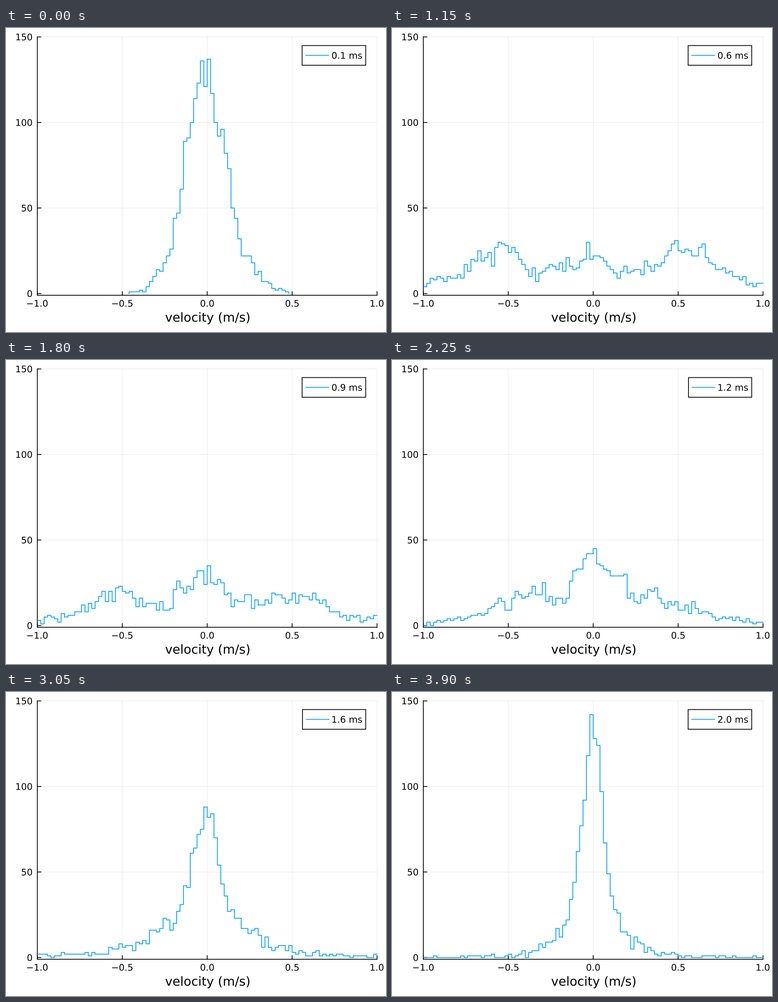
Recreate the animation shown at these times as a matplotlib script. Size 837 px wide and 669 px high, loop 3950 ms.

```python
import numpy as np
import matplotlib
import matplotlib.pyplot as plt
from matplotlib.animation import FuncAnimation
from matplotlib.patches import PathPatch, Rectangle
from matplotlib.textpath import TextPath
from matplotlib.transforms import Affine2D

matplotlib.rcParams["font.family"] = "DejaVu Sans"
matplotlib.rcParams["path.snap"] = False

W, H, DPI = 837, 669, 100
FRAMES, INTERVAL = 79, 50
LEFT, RIGHT, TOP, BOTTOM = 69, 817.3, 19.6, 588.2
X0, X_UNIT = 443.2, 374.1
Y0, Y_UNIT = 584.4, 3.765
BLUE = "#009AFA"
PX = 72 / DPI

# Velocity profile: counts per bin at a few knots (in bins of 0.02 m/s)
HALF = np.array([1, 3, 5, 8, 12, 18, 25, 32, 40, 50])
KNOTS = np.concatenate([-HALF[::-1], HALF])
KEY_FRAMES = [0, 11, 23, 36, 54, 68, 78]
PROFILES = [
    [0, 0, 0, 0, 2, 20, 55, 96, 110, 126, 122, 104, 83, 49, 18, 5, 0, 0, 0, 0],
    [3, 7, 15, 38, 25, 23, 26, 16, 28, 44, 39, 35, 22, 24, 17, 28, 29, 19, 6, 4],
    [6, 10, 22, 26, 12, 13, 17, 16, 20, 23, 22, 20, 16, 12, 15, 15, 26, 24, 11, 4],
    [3, 5, 16, 21, 12, 11, 21, 21, 28, 29, 31, 26, 21, 16, 17, 13, 17, 14, 5, 4],
    [1, 3, 5, 8, 12, 17, 27, 43, 54, 71, 72, 57, 37, 22, 16, 10, 8, 4, 2, 1],
    [1, 1, 1, 2, 5, 14, 30, 50, 74, 111, 115, 76, 42, 23, 6, 5, 1, 1, 0.6, 0.4],
    [0.1, 0.4, 0.5, 0.8, 3, 8, 17, 50, 89, 133, 131, 78, 40, 18, 8, 3.5, 0.7, 0.3, 0.4, 0.2],
]
EDGES = np.arange(-50, 51)
LEVELS = np.linspace(0, 1, 3001)[1:-1]


def quantiles(profile):
    counts = np.interp(EDGES[:-1] + 0.5, KNOTS, profile)
    cdf = np.concatenate([[0], np.cumsum(counts)])
    return np.interp(LEVELS, cdf / cdf[-1], EDGES), cdf[-1]


QUANTS = [quantiles(p) for p in PROFILES]


def histogram(i):
    """Counts per bin: spread the cloud between two profiles, add shot noise."""
    k = min(np.searchsorted(KEY_FRAMES, i, side="right") - 1, len(KEY_FRAMES) - 2)
    a, b = KEY_FRAMES[k], KEY_FRAMES[k + 1]
    f = (i - a) / (b - a)
    (qa, na), (qb, nb) = QUANTS[k], QUANTS[k + 1]
    pos = (1 - f) * qa + f * qb
    total = (1 - f) * na + f * nb
    mean = total * np.diff(np.interp(EDGES, pos, LEVELS, left=0, right=1))
    noise = np.random.default_rng(100 + i).normal(size=len(mean))
    return np.maximum(0, np.rint(mean + 0.7 * np.sqrt(mean) * noise))


# The small margin keeps the pixel size from rounding down
fig = plt.figure(figsize=((W + 0.01) / DPI, (H + 0.01) / DPI), dpi=DPI,
                 facecolor="white")
ax = fig.add_axes([0, 0, 1, 1])
ax.set_xlim(0, W)
ax.set_ylim(H, 0)
ax.axis("off")


def line(x, y, color="black", width=1.7, **kw):
    return ax.plot(x, y, color=color, lw=width * PX, **kw)[0]


def text_path(s, x, base, size, align="center"):
    path = TextPath((0, 0), s, size=size)
    box = path.get_extents()
    shift = {"left": 0, "center": (box.x0 + box.x1) / 2, "right": box.x1}[align]
    return Affine2D().translate(-shift, 0).scale(1, -1).translate(x, base).transform_path(path)


def text(*args, **kw):
    patch = PathPatch(text_path(*args, **kw), fc="black", lw=0, zorder=6)
    return ax.add_patch(patch)


for v in (-1.0, -0.5, 0.0, 0.5, 1.0):
    x = X0 + X_UNIT * v
    line([x, x], [TOP, BOTTOM], alpha=0.1, width=0.9, zorder=1)
    line([x, x], [BOTTOM, BOTTOM - 8], zorder=2)
    text(f"{v:.1f}".replace("-", "\u2212"), x, 613.2, 20)

for n in (0, 50, 100, 150):
    y = Y0 - Y_UNIT * n
    line([LEFT, RIGHT], [y, y], alpha=0.1, width=0.9, zorder=1)
    line([LEFT, LEFT + 8], [y, y], zorder=2)
    text(str(n), 57.3, y + 7.4, 20, align="right")

line([LEFT, LEFT, RIGHT], [TOP, BOTTOM, BOTTOM], zorder=2)
text("velocity (m/s)", X0 + 0.5, 646.3, 27.5)

curve = line([], [], BLUE, zorder=3, solid_joinstyle="miter")
curve.set_clip_path(Rectangle((LEFT, TOP - 0.5), RIGHT - LEFT + 0.5,
                              BOTTOM - TOP, transform=ax.transData))

box = ax.add_patch(Rectangle((652.3, 38.6), 140, 43.4, fc="white", ec="black",
                             lw=1.7 * PX, zorder=4))
sample = line([], [], BLUE, zorder=5)
label = text("0.1 ms", 716.8, 67.6, 20, align="left")


def draw(i):
    counts = histogram(i)
    used = np.flatnonzero(counts)
    lo, hi = (used[0], used[-1] + 1) if i < 8 else (0, len(counts))
    x = np.repeat(X0 + X_UNIT * EDGES[lo:hi + 1] / 50, 2)
    y = np.concatenate([[0], np.repeat(counts[lo:hi], 2), [0]])
    if i >= 8:
        x, y = x[1:-1], y[1:-1]
    curve.set_data(x, Y0 - Y_UNIT * y)

    s = f"{(i + 2) / 40:.1f} ms"
    left = 653.1 if s[0] == "1" else 652.3
    box.set_x(left)
    box.set_width(792.3 - left)
    sample.set_data([left + 8, left + 58.6], [60.3, 60.3])
    label.set_path(text_path(s, 716.8, 67.6, 20, align="left"))
    return curve, box, sample, label


anim = FuncAnimation(fig, draw, frames=FRAMES, interval=INTERVAL,
                     init_func=lambda: draw(0), repeat=True, blit=False)
plt.show()
```
